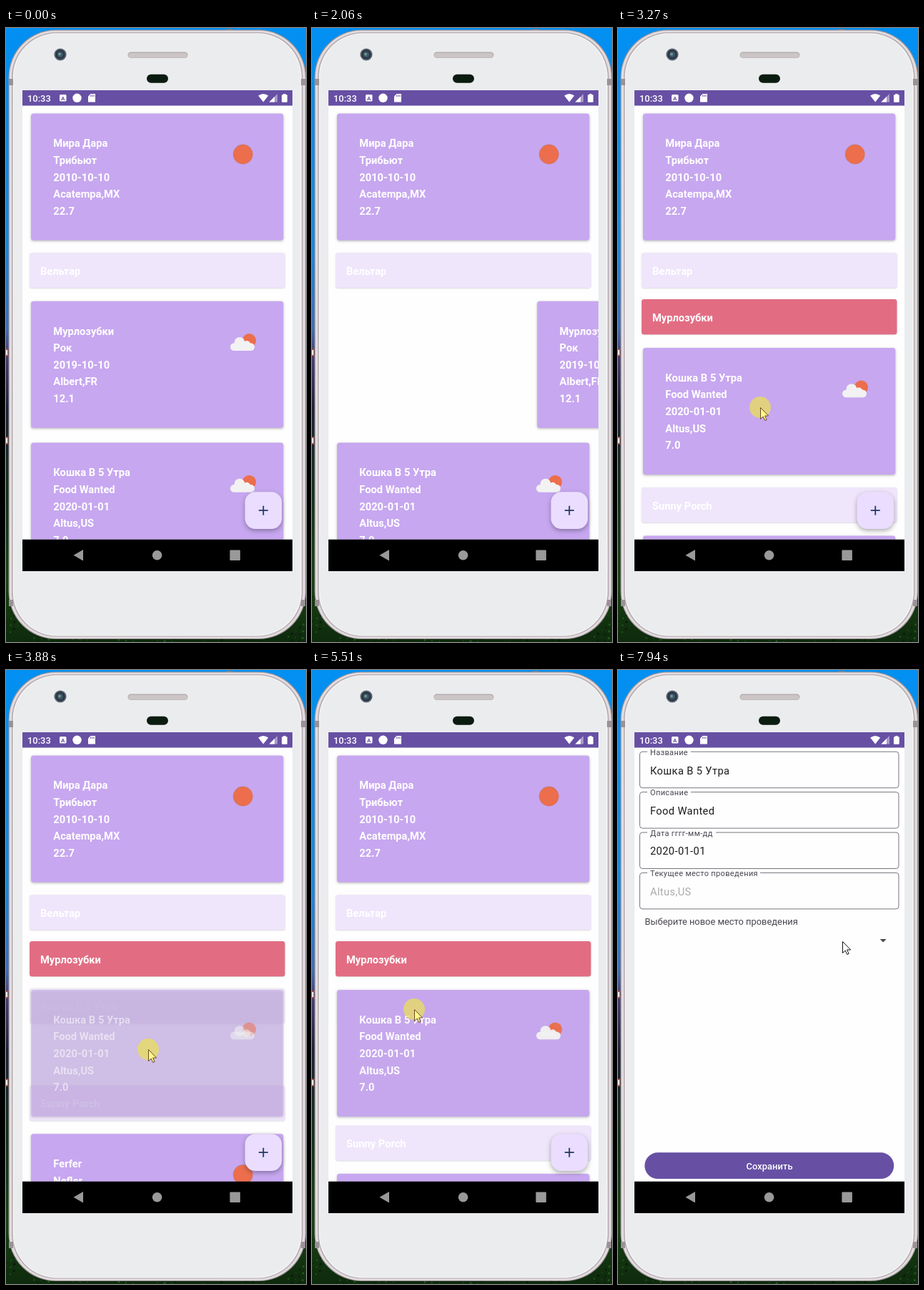
These frames come from a looping animation (420x858 px, 8000 ms). An HTML page with a canvas:

```html
<!DOCTYPE html>
<html lang="ru">
<head>
<meta charset="utf-8">
<title>Concert list</title>
<style>
html, body { margin: 0; width: 100%; height: 100%; overflow: hidden; background: #0b7fe0; }
canvas { display: block; width: 420px; height: 858px; }
</style>
</head>
<body>
<canvas id="stage"></canvas>
<script>
const W = 420, H = 858, LOOP = 8000;
const canvas = document.getElementById('stage');
const ratio = window.devicePixelRatio || 1;
canvas.width = W * ratio;
canvas.height = H * ratio;
const ctx = canvas.getContext('2d');

const PURPLE = '#6750a4', CARD = '#c7a7f0', BAR = '#efe6fb', RED = '#e26d83';
const BAR_H = 65, CARD_H = 197.5;

const items = [
  { lines: ['Мира Дара', 'Трибьют', '2010-10-10', 'Acatempa,MX', '22.7'], icon: sun },
  { lines: ['Вельтар'] },
  { lines: ['Мурлозубки', 'Рок', '2019-10-10', 'Albert,FR', '12.1'], icon: cloud },
  { lines: ['Кошка В 5 Утра', 'Food Wanted', '2020-01-01', 'Altus,US', '7.0'], icon: cloud },
  { lines: ['Sunny Porch'] },
  { lines: ['Ferfer', 'Nefler', '2021-03-03', 'Alma,US', '18.4'], icon: sun }
];

const fields = [
  { label: 'Название', value: 'Кошка В 5 Утра', gap: 102 },
  { label: 'Описание', value: 'Food Wanted', gap: 102 },
  { label: 'Дата гггг-мм-дд', value: '2020-01-01', gap: 137 },
  { label: 'Текущее место проведения', value: 'Altus,US', gap: 199, off: true }
];

// Pointer path: time, x, y
const path = [
  [330, 370, 824], [540, 318, 680], [680, 279, 582], [750, 259, 553], [890, 217, 525],
  [1090, 217, 525], [1230, 221, 520], [1510, 264, 500], [1580, 289, 497], [1720, 440, 503],
  [2660, 440, 506], [2730, 398, 511], [2870, 300, 520], [3080, 199, 530],
  [4570, 199, 530], [4850, 143, 474], [5650, 143, 474], [5900, 134, 506],
  [7600, 134, 506], [7940, 314, 379]
];
const presses = [[1090, 1990], [3270, 4560], [4845, 5640], [5970, 6105]];

const clamp = v => Math.min(1, Math.max(0, v));
const progress = (t, start, dur) => clamp((t - start) / dur);
const ease = p => (1 - Math.cos(Math.PI * p)) / 2;
const mix = (a, b, p) => a + (b - a) * p;

function pointer(t) {
  if (t < path[0][0]) return null;
  const i = path.findIndex(k => k[0] > t);
  if (i < 0) return path[path.length - 1].slice(1);
  const a = path[i - 1], b = path[i], p = (t - a[0]) / (b[0] - a[0]);
  return [mix(a[1], b[1], p), mix(a[2], b[2], p)];
}

function box(x, y, w, h, r, fill) {
  ctx.beginPath();
  ctx.roundRect(x, y, w, h, r);
  ctx.fillStyle = fill;
  ctx.fill();
}

function disc(x, y, r, fill) {
  ctx.beginPath();
  ctx.arc(x, y, r, 0, Math.PI * 2);
  ctx.fillStyle = fill;
  ctx.fill();
}

function poly(points, fill) {
  ctx.beginPath();
  points.forEach(([x, y]) => ctx.lineTo(x, y));
  ctx.closePath();
  ctx.fillStyle = fill;
  ctx.fill();
}

function text(str, x, y, size, weight, fill, spacing = 0, align = 'left') {
  ctx.font = `${weight} ${size}px Roboto, sans-serif`;
  ctx.letterSpacing = spacing + 'px';
  ctx.textAlign = align;
  ctx.fillStyle = fill;
  ctx.fillText(str, x, y);
}

function shadow(alpha, blur, dy) {
  ctx.shadowColor = `rgba(0,0,0,${alpha})`;
  ctx.shadowBlur = blur * ratio;
  ctx.shadowOffsetY = dy * ratio;
}

function layer(alpha, draw) {
  if (alpha <= 0) return;
  ctx.save();
  ctx.globalAlpha = alpha;
  draw();
  ctx.restore();
}

function sun(y) {
  disc(331.7, y + 57, 13.9, '#b98088');
  disc(331.9, y + 57, 13.3, '#ec6e4c');
}

function cloud(y) {
  disc(340.5, y + 55, 9.6, '#ec6e4c');
  box(314, y + 58.5, 34, 10.8, 5.4, '#f2f2f2');
  disc(327, y + 57.5, 7.3, '#f2f2f2');
  disc(337, y + 60.5, 5.2, '#f2f2f2');
}

function card(item, top, dx = 0) {
  const y = top + 2.5;
  ctx.save();
  ctx.translate(dx, 0);
  ctx.save();
  shadow(0.28, 3.5, 1.2);
  box(35, y, 353.3, 177, 3.5, CARD);
  ctx.restore();
  item.lines.forEach((s, i) => text(s, 66.3, y + 46.8 + i * 23.6, 14.7, 700, '#fff'));
  item.icon(y);
  ctx.restore();
}

function bar(item, top, fill = BAR, dx = 0) {
  ctx.save();
  ctx.translate(dx, 0);
  ctx.save();
  shadow(0.18, 1.5, 0.5);
  box(33, top, 357.5, 49.3, 3.5, fill);
  ctx.restore();
  text(item.lines[0], 48, top + 30.5, 14.7, 700, '#fff');
  ctx.restore();
}

function list(t) {
  const swap = ease(progress(t, 2183, 250));
  const open = 1 - ease(progress(t, 3762, 250)) + ease(progress(t, 5294, 250));
  const top3 = 577 - (CARD_H - BAR_H) * swap;
  const top4 = top3 + mix(BAR_H, CARD_H, open);

  card(items[0], 117);
  bar(items[1], 314.3);
  bar(items[4], top4);
  card(items[5], top4 + BAR_H);

  if (t < 2183) {
    // The card trails the pointer by one screen update
    const pull = t < 1090 ? 0 : pointer(Math.min(t, 1790) - 70)[0] - 217;
    const drag = Math.max(0, pull);
    card(items[2], 379.2, mix(drag, 370, progress(t, 1985, 195)));
  } else {
    layer(swap, () => bar(items[2], 379, RED, 370 * (1 - swap)));
  }

  layer(1 - open, () => bar(items[3], top3));
  layer(open, () => card(items[3], top3));

  ctx.save();
  shadow(0.32, 6, 2.5);
  box(334.5, 648.3, 51.7, 51.7, 14.7, '#eaddff');
  ctx.restore();
  box(353.8, 673.3, 13, 1.8, 0, '#213a5e');
  box(359.4, 667.7, 1.8, 13, 0, '#213a5e');
}

function field(f, y, p) {
  ctx.save();
  ctx.beginPath();
  ctx.rect(23, 109, 378, 606);
  ctx.rect(41, y - 1, f.gap - 41, 2);
  ctx.clip('evenodd');
  ctx.beginPath();
  ctx.roundRect(30.5, y, 362.5, 50.5, 3.7);
  ctx.strokeStyle = '#79747e';
  ctx.lineWidth = 1;
  ctx.stroke();
  ctx.restore();
  text(f.value, 45, y + 31.3, 14.7, 400, f.off ? '#adabae' : '#1c1b1f', 0.36);
  ctx.save();
  ctx.translate(45, mix(y + 31, y + 4.8, p));
  ctx.scale(mix(1, 0.75, p), mix(1, 0.75, p));
  text(f.label, 0, 0, 14.7, 400, '#49454f', 0.46);
  ctx.restore();
}

function form(t) {
  const p = ease(progress(t, 6850, 220));
  fields.forEach((f, i) => field(f, 114.2 + i * 56.4, p));
  text('Выберите новое место проведения', 37.5, 355.6, 12.9, 400, '#49454f');
  poly([[366.8, 376], [375.6, 376], [371.2, 380.4]], '#49454f');
  box(37.3, 674.3, 349, 36.8, 18.4, PURPLE);
  text('Сохранить', 212, 697.6, 12.9, 500, '#fff', 0.05, 'center');
}

function desktop() {
  const g = ctx.createLinearGradient(0, 0, 0, H);
  [[0, '#0290f2'], [0.35, '#1489e2'], [0.49, '#3f6fb4'], [0.53, '#4a3f78'],
   [0.62, '#1c2138'], [0.76, '#12301a'], [0.9, '#1a4214'], [1, '#0e2a0d']]
    .forEach(([p, c]) => g.addColorStop(p, c));
  ctx.fillStyle = g;
  ctx.fillRect(0, 0, W, H);
  for (let i = 0; i < 300; i++) {
    const x = (i * 37.7) % W, y = 795 + (i * 23.3) % 63;
    disc(x, y, 0.8 + i % 3 * 0.4, i % 2 ? '#22551a' : '#081c08');
  }
  for (const y of [448, 571]) {
    box(0, y, 3, 11, 0, '#a8483c');
    box(0, y + 2, 2, 7, 0, '#fff');
  }
}

function phone() {
  box(308, 1.5, 10, 6, 1, '#8c8488');
  box(3.5, 2.5, 416.5, 851.5, 66, '#9a9296');
  box(4.6, 3.6, 414.3, 849.3, 65, '#e3dcdf');
  box(8, 6, 407.5, 844.6, 62.5, '#b3abaf');
  box(9.6, 7.2, 404.3, 842.2, 61.5, '#f5f4f5');
  box(11.2, 8.5, 401, 839.6, 60, '#ebecee');
  for (const y of [71, 799]) {
    for (const x of [4, 413]) box(x, y, 6, 9, 0, '#9a9296');
  }
  disc(76, 37, 8.6, '#5c6472');
  disc(76, 37, 6.8, '#2a3744');
  disc(76, 37, 4, '#41566c');
  disc(75, 36.5, 1.9, '#6b9a88');
  box(170.5, 33.5, 84, 8.5, 4.2, '#b5aeb0');
  box(171.5, 35, 82, 6.5, 3.2, '#cbc5c6');
  box(197, 64.8, 30, 12, 6, '#0a1c10');
}

function statusBar() {
  box(23, 87, 378, 21.6, 0, PURPLE);
  text('10:33', 30, 102.6, 12.9, 500, '#fff');
  box(75, 93, 9.5, 9.5, 1.5, '#fff');
  text('A', 79.8, 101, 8, 700, PURPLE, 0, 'center');
  disc(99.5, 97.8, 6.2, '#fff');
  poly([[118.5, 92], [125, 92], [125, 103.5], [115, 103.5], [115, 95.5]], '#fff');
  for (const x of [118.2, 120.4, 122.6]) box(x, 93.5, 1, 2.6, 0, PURPLE);
  ctx.beginPath();
  ctx.moveTo(360.2, 103.5);
  ctx.lineTo(353.2, 94.6);
  ctx.quadraticCurveTo(360.2, 89.3, 367.2, 94.6);
  ctx.fillStyle = '#fff';
  ctx.fill();
  poly([[380, 92], [380, 103.5], [368.5, 103.5]], '#a99bcd');
  poly([[376, 96], [376, 103.5], [368.5, 103.5]], '#fff');
  box(386, 93.2, 7.8, 10.5, 1, '#fff');
  box(388.2, 92, 3.4, 2, 0, '#fff');
}

function navBar() {
  box(23, 714.7, 378, 44.3, 0, '#000');
  poly([[94.5, 736.7], [108, 729], [108, 744.4]], '#999');
  disc(211.6, 736.7, 6.8, '#999');
  box(313.4, 729.4, 14.5, 14.5, 1, '#999');
}

function cursor(t) {
  const at = pointer(t);
  if (!at) return;
  const down = presses.some(([a, b]) => t >= a && t < b);
  ctx.save();
  ctx.translate(at[0], at[1]);
  if (down) disc(0, 0, 15, 'rgba(232,222,90,0.75)');
  ctx.translate(0.5, 0.5);
  poly([[0, 0], [0, 16], [3.7, 12.5], [6.2, 18], [8.6, 17], [6.2, 11.5], [11.2, 11.5]],
    down ? '#fff88c' : '#fff');
  ctx.strokeStyle = down ? '#6b4a20' : '#111';
  ctx.lineWidth = 1;
  ctx.stroke();
  ctx.restore();
}

function render(t) {
  ctx.setTransform(ratio, 0, 0, ratio, 0, 0);
  desktop();
  phone();
  box(23, 87, 378, 672, 0, '#fefefe');
  ctx.save();
  ctx.beginPath();
  ctx.rect(23, 108.6, 378, 606.1);
  ctx.clip();
  if (t < 6835) list(t); else form(t);
  ctx.restore();
  statusBar();
  navBar();
  cursor(t);
}

const begin = performance.now();
function tick() {
  render((performance.now() - begin) % LOOP);
  requestAnimationFrame(tick);
}
tick();
</script>
</body>
</html>
```
